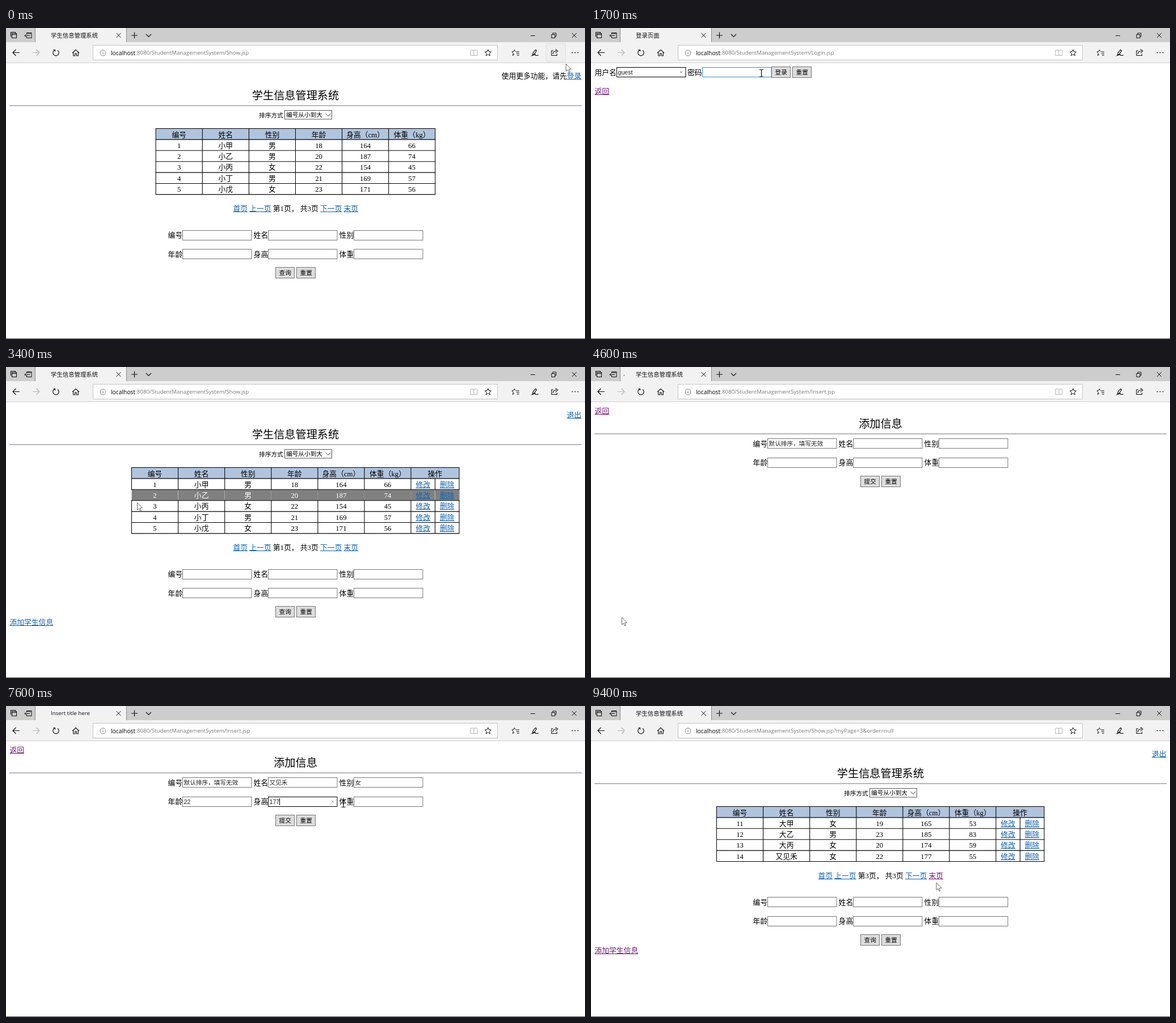
These frames come from a looping animation (1021 px wide and 549 px high, 9900 ms). An HTML page with a canvas:

```html
<!DOCTYPE html>
<html lang="zh">
<head>
<meta charset="utf-8">
<title>学生信息管理系统</title>
<style>
html, body { margin: 0; width: 100%; height: 100%; overflow: hidden; background: #fff; }
canvas { display: block; }
</style>
</head>
<body>
<canvas id="stage" width="1021" height="549"></canvas>
<script>
const ctx = document.getElementById('stage').getContext('2d');
const LOOP = 9900;
const CJK = '"Noto Sans CJK SC", "Noto Sans CJK", sans-serif';
const PAGE = '"Liberation Serif", ' + CJK;
const FIELD = '"Liberation Sans", ' + CJK;
const UI = '"Open Sans", ' + CJK;
const BODY = 12.8, SMALL = 10.67;
const BLUE = '#0b62b8', PURPLE = '#74187a', INK = '#000';

// Last entry of a [time, ...] list that has begun
const at = (list, t) => list.filter(e => e[0] <= t).pop();
const within = (t, a, b) => t >= a && t < b;

const NEW_NAME = '又见禾';
const SITE = ':8080/StudentManagementSystem/';
const pages = [
  [0, 'show', 'Show.jsp'],
  [700, 'login', 'Login.jsp'],
  [2400, 'show', 'Show.jsp'],
  [4600, 'insert', 'Insert.jsp'],
  [8300, 'show', 'Show.jsp'],
  [8900, 'show', 'Show.jsp?myPage=3&order=null']
];
const titles = [
  [0, '学生信息管理系统', 10.4],
  [900, '登录页面', 10.4],
  [2600, '学生信息管理系统', 10.4],
  [4900, 'Insert title here', 9.7],
  [8700, '学生信息管理系统', 10.4]
];
const loads = [[700, 900], [2400, 2600], [4600, 4800], [8300, 8500]];

// time, x, y, shape, glide from the previous point
const moves = [
  [0, 987, 63.5, 'arrow'],
  [500, 1000, 84, 'hand'],
  [700, 1000, 84, 'arrow'],
  [800, 1000, 84, 'arrow'],
  [1100, 105, 79.5, 'beam', 1],
  [1600, 105, 79.5, 'beam'],
  [1700, 300.5, 79.5, 'beam'],
  [2200, 335, 79, 'arrow'],
  [2500, 335, 79, 'arrow'],
  [3000, 186, 138, 'arrow', 1],
  [3200, 306, 193, 'arrow'],
  [3400, 231, 239.5, 'arrow'],
  [3600, 82, 395, 'arrow'],
  [4100, 43, 446, 'hand'],
  [4600, 54, 442, 'arrow'],
  [4800, 54, 442, 'arrow'],
  [5400, 545.5, 139, 'beam', 1],
  [6100, 545.5, 139, 'beam'],
  [6200, 657.5, 145, 'beam', 1],
  [6500, 657.5, 145, 'beam'],
  [6700, 370.5, 172, 'beam', 1],
  [7000, 370.5, 172, 'beam'],
  [7200, 521.5, 172, 'beam', 1],
  [7500, 521.5, 172, 'beam'],
  [7700, 668.5, 172, 'beam', 1],
  [7900, 668.5, 172, 'beam'],
  [8200, 495, 202, 'arrow', 1],
  [8400, 501, 198.5, 'arrow'],
  [8700, 607, 317, 'hand'],
  [9400, 608.5, 312, 'arrow']
];

// One keystroke per `gap` ms
const keys = (word, start, gap = 100, size = 1) =>
  Array.from({ length: Math.ceil(word.length / size) },
    (_, i) => [start + i * gap, word.slice(0, (i + 1) * size)]);

const loginFields = [
  { press: 1100, blur: 1800, log: keys('guest', 1200) },
  { press: 1700, blur: 2400, log: keys('●●●●', 1800) }
];
const insertFields = [
  { log: [[0, '默认排序，填写无效']] },
  { press: 5500, blur: 6300, log: [...keys('youjianhe', 5600, 100, 2), [6100, NEW_NAME]] },
  { press: 6200, blur: 6800, log: [...keys('nv', 6300), [6500, '女']] },
  { press: 6700, blur: 7300, log: keys('22', 6900) },
  { press: 7200, blur: 7800, log: keys('177', 7300) },
  { press: 7700, blur: 8200, log: keys('55', 7800) }
];

const labels = ['编号', '姓名', '性别', '年龄', '身高', '体重'];
const heads = ['编号', '姓名', '性别', '年龄', '身高（cm）', '体重（kg）'];
const firstRows = ['1 小甲 男 18 164 66', '2 小乙 男 20 187 74', '3 小丙 女 22 154 45',
  '4 小丁 男 21 169 57', '5 小戊 女 23 171 56'];
const lastRows = ['11 大甲 女 19 165 53', '12 大乙 男 23 185 83', '13 大丙 女 20 174 59',
  `14 ${NEW_NAME} 女 22 177 55`];

function rect(x, y, w, h, color) {
  ctx.fillStyle = color;
  ctx.fillRect(x, y, w, h);
}

function frame(x, y, w, h, color, fill) {
  if (fill) rect(x, y, w, h, fill);
  ctx.strokeStyle = color;
  ctx.lineWidth = 1;
  ctx.strokeRect(x, y, w, h);
}

function stroke(d, color = '#111', width = 1) {
  ctx.strokeStyle = color;
  ctx.lineWidth = width;
  ctx.stroke(new Path2D(d));
}

// Draws text centred vertically on cy and returns its width
function text(s, x, cy, { size = BODY, font = PAGE, color = INK, align = 0, link } = {}) {
  ctx.font = `${size}px ${font}`;
  const w = ctx.measureText(s).width;
  const left = x - w * align;
  const base = cy + size * 0.36;
  ctx.fillStyle = link || color;
  ctx.fillText(s, left, base);
  if (link) rect(left, Math.round(base + 1), w, 1, link);
  return w;
}

function input(x, cy, field, t) {
  const y = Math.floor(cy - 8.5) + 0.5;
  const { press, blur, log = [] } = field || {};
  const pressed = press && within(t, press, press + 100);
  const focused = press && within(t, press + 100, blur);
  frame(x, y, 121.5, 17, pressed ? '#2a93d5' : focused ? '#000' : '#767676', '#fff');
  const entry = at(log, t);
  const value = entry ? entry[1] : '';
  const w = text(value, x + 2, cy + 0.5, { size: SMALL, font: FIELD, color: '#222' });
  if (!focused) return;
  if (t < blur - 100) rect(Math.round(x + 2 + w), y + 2.5, 1, 12, '#000');
  if (value) stroke(`M${x + 111.5} ${cy - 2}l4 4m0 -4l-4 4`, '#777', 0.8);
}

function button(label, x, cy) {
  frame(x, Math.floor(cy - 9.5) + 0.5, 33, 19, '#777', '#dddddd');
  text(label, x + 16.7, cy + 0.2, { size: SMALL, font: FIELD, align: 0.5 });
}

function form(cy, submit, fields, t) {
  labels.forEach((label, i) => {
    const x = 285.6 + (i % 3) * 151;
    const y = cy + (i > 2 ? 33.6 : 0);
    text(label, x, y);
    input(Math.round(x + 25.6) + 0.5, y, fields && fields[i], t);
  });
  button(submit, 475.5, cy + 66.5);
  button('重置', 512.5, cy + 66.5);
}

function heading(s, cy) {
  text(s, 510.5, cy, { size: 19.2, align: 0.5 });
  rect(6, cy + 17.4, 1009, 1.2, '#888');
}

function table(rows, member, lit) {
  const left = member ? 221.5 : 264.2, top = 177.5, colW = 82.1, rowH = 19.4;
  const ops = left + colW * 6;
  const right = ops + (member ? 85 : 0);
  const rowY = i => top + i * rowH;
  const bottom = rowY(rows.length + 1);
  const line = (x1, y1, x2, y2, color = '#000') => stroke(`M${x1} ${y1}L${x2} ${y2}`, color, 1.06);

  rect(left, top, right - left, rowH, '#b0c4de');
  if (lit >= 0) rect(left, rowY(lit + 1), right - left, rowH, '#808080');
  for (let i = 0; i <= rows.length + 1; i++) line(left - 0.5, rowY(i), right + 0.5, rowY(i));

  const xs = Array.from({ length: 7 }, (_, i) => left + i * colW);
  if (member) xs.push(ops + 42.5, right);
  xs.forEach((x, i) => {
    line(x, i === 7 ? rowY(1) : top, x, bottom);
    if (lit >= 0) line(x, rowY(lit + 1) + 1, x, rowY(lit + 2) - 1, '#d0d0d0');
  });

  const mid = i => left + (i + 0.5) * colW;
  heads.forEach((s, i) => text(s, mid(i), 188, { align: 0.5 }));
  if (member) text('操作', ops + 42.5, 188, { align: 0.5 });
  rows.forEach((row, r) => {
    const cy = 207 + r * rowH;
    const color = r === lit ? '#fff' : INK;
    row.split(' ').forEach((s, i) => text(s, mid(i), cy, { align: 0.5, color }));
    if (!member) return;
    text('修改', ops + 21.3, cy, { align: 0.5, link: BLUE });
    text('删除', ops + 63.7, cy, { align: 0.5, link: BLUE });
  });
}

function pager(cy, page, lastLink) {
  let x = 400.4;
  const parts = [['首页', BLUE], ['上一页', BLUE], [`第${page}页，`], ['共3页'], ['下一页', BLUE], ['末页', lastLink]];
  for (const [s, link] of parts) x += text(s, x, cy, { link }) + 3.2;
}

function showPage(t) {
  const member = t >= 2400;
  const last = t >= 8900;
  const shift = last ? -19.4 : 0;
  const lit = within(t, 3400, 3600) ? 1 : within(t, 8500, 8700) ? 0 : -1;

  const w = text(member ? '退出' : '登录', 1014.6, 84, { align: 1, link: BLUE });
  if (!member) text('使用更多功能，请先', 1014.6 - w, 84, { align: 1 });
  heading('学生信息管理系统', 119);
  text('排序方式', 488.7, 154, { size: SMALL, align: 1 });
  frame(491.5, 145.5, 83, 15.5, '#555', '#fff');
  text('编号从小到大', 494, 153.5, { size: SMALL, font: FIELD });
  stroke('M563.5 151l4.5 4.5l4.5 -4.5', '#333');
  table(last ? lastRows : firstRows, member, lit);
  pager(318.5 + shift, last ? 3 : 1, t >= 9400 ? PURPLE : BLUE);
  form(365.5 + shift, '查询');
  if (member) text('添加学生信息', 6.4, 450.5 + shift, { link: t >= 4600 ? PURPLE : BLUE });
}

function loginPage(t) {
  text('用户名', 6.4, 78);
  input(45.5, 78, loginFields[0], t);
  text('密码', 170, 78);
  input(196.5, 78, loginFields[1], t);
  button('登录', 318.5, 78);
  button('重置', 355.5, 78);
  text('返回', 6.4, 111, { link: PURPLE });
}

function insertPage(t) {
  text('返回', 6.4, 77.5, { link: PURPLE });
  heading('添加信息', 100);
  form(135, '提交', insertFields, t);
}

function star(cx, cy, r) {
  let d = '';
  for (let i = 0; i < 10; i++) {
    const a = i * Math.PI / 5, k = i % 2 ? r * 0.45 : r;
    d += `${i ? 'L' : 'M'}${cx + k * Math.sin(a)} ${cy - k * Math.cos(a)}`;
  }
  stroke(d + 'Z');
}

function dot(x, y, r) {
  ctx.beginPath();
  ctx.arc(x, y, r, 0, Math.PI * 2);
  ctx.fill();
}

function tabBar(t) {
  rect(0, 0, 1021, 25, '#cdcdcd');
  rect(52, 0, 160, 26, '#f2f2f2');
  rect(51, 0, 1, 25, '#8c8c8c');
  rect(212, 0, 1, 25, '#8c8c8c');
  stroke('M8.5 15.5v-8h8v2M10.5 11.5v-2h8v8h-8zM10.5 11.5h8', '#111', 1.1);
  stroke('M36.5 11v-2.5h8.5v9h-8.5v-2.5M42 13.5h-9M35.5 11l-2.5 2.5l2.5 2.5M36.5 10h8');
  stroke('M194.5 9l8 8m0 -8l-8 8');
  stroke('M221 13h11M226.5 7.5v11', '#111', 1.2);
  stroke('M247 11l4.5 4.5l4.5 -4.5', '#111', 1.2);
  stroke('M925 13.5h8M962 11.5h6v6h-6zM964 11v-2h6v6h-2M998 9l8 8m0 -8l-8 8');

  const [, title, size] = at(titles, t);
  text(title, 79, 13, { size, font: UI, color: '#111' });
  const load = loads.find(([a, b]) => within(t, a, b));
  if (!load) return;
  ctx.fillStyle = '#555';
  for (let i = 0; i <= (t - load[0]) / 100; i++) {
    const a = (160 - i * 60) * Math.PI / 180;
    dot(63 + 5 * Math.cos(a), 13 + 5 * Math.sin(a), 0.9);
  }
}

function toolbar(t) {
  rect(0, 25, 1021, 37, '#f2f2f2');
  rect(0, 61, 1021, 1, '#cfcfcf');
  if (t < 500) frame(952.5, 27.5, 34, 32, '#e0e0e0', '#efefef');
  stroke('M24 43.5h-12M17.5 38l-5.5 5.5l5.5 5.5', '#111', 1.2);
  stroke('M47 43.5h12M53.5 38l5.5 5.5l-5.5 5.5', '#b5b5b5', 1.2);
  stroke('M85.5 39.2A5.2 5.2 0 1 0 91 39.5M83.5 38.5h3v3', '#111', 1.2);
  stroke('M117 44l6 -5.5l6 5.5M118.7 43v6h3v-4h2.6v4h3v-6', '#111', 1.1);

  frame(153.5, 30.5, 713, 26, '#c4c4c4', '#fff');
  stroke('M166 44a5 5 0 1 0 10 0a5 5 0 1 0 -10 0M171 43v3.5M171 41v1', '#777', 0.9);
  text('localhost', 185, 44, { size: 10.3, font: UI });
  text(SITE + at(pages, t)[2], 228.5, 44, { size: 9.7, font: UI, color: '#777' });
  stroke('M825 39.5q-3 -1.5 -6 0v9q3 -1 6 0.5q3 -1.5 6 -0.5v-9q-3 -1.5 -6 0v9.5', '#b0b0b0');
  star(850, 44, 6);
  stroke('M899 42h6M900 45h5M901 48h4M898 41.5l-1.5 -3l-1.5 3l-3 0.5l2.5 2.5l-1 4l3 -2');
  stroke('M928 48.5q1 -6 6 -10l1.5 1.5q-2 5 -7.5 8.5q4 -1 5 -2q0 2 2 2t4 -0.5', '#111', 1.1);
  stroke('M965 40h-3v8.5h9.5v-3M964.5 46q0 -5 6 -5.5M969 37.5l4 3.3l-4 3.3', '#111', 1.1);
  ctx.fillStyle = '#111';
  for (const x of [998.5, 1003.5, 1008.5]) dot(x, 43.5, 0.9);
}

const arrow = new Path2D('M0.5 0v13l3 -2.8l2 4.8l2 -0.9l-2 -4.7h4z');
const hand = new Path2D('M0 0q1.5 -1 2.5 0.5v6q4 0 6 2v4l-2 5h-6l-4.5 -6q0 -2 4 0z');

function pointer(t) {
  const i = moves.indexOf(at(moves, t));
  const next = moves[i + 1];
  let [start, x, y, shape] = moves[i];
  if (next && next[4]) {
    const p = (t - start) / (next[0] - start);
    x += (next[1] - x) * p;
    y += (next[2] - y) * p;
  }
  if (shape === 'beam') {
    stroke(`M${x - 3.5} ${y - 6}h7M${x} ${y - 6}v13M${x - 3.5} ${y + 6.5}h7`, '#111', 1.2);
    return;
  }
  const path = shape === 'hand' ? hand : arrow;
  ctx.save();
  ctx.translate(x, y);
  ctx.fillStyle = '#fff';
  ctx.fill(path);
  ctx.strokeStyle = '#444';
  ctx.lineWidth = 0.8;
  ctx.stroke(path);
  ctx.restore();
}

const views = { show: showPage, login: loginPage, insert: insertPage };
const begin = performance.now();

function draw() {
  // The picture advances ten times a second
  const t = Math.floor((performance.now() - begin) % LOOP / 100) * 100;
  rect(0, 0, 1021, 549, '#fff');
  tabBar(t);
  toolbar(t);
  views[at(pages, t)[1]](t);
  rect(0, 548, 1021, 1, '#4a4a4a');
  pointer(t);
  requestAnimationFrame(draw);
}
draw();
</script>
</body>
</html>
```
